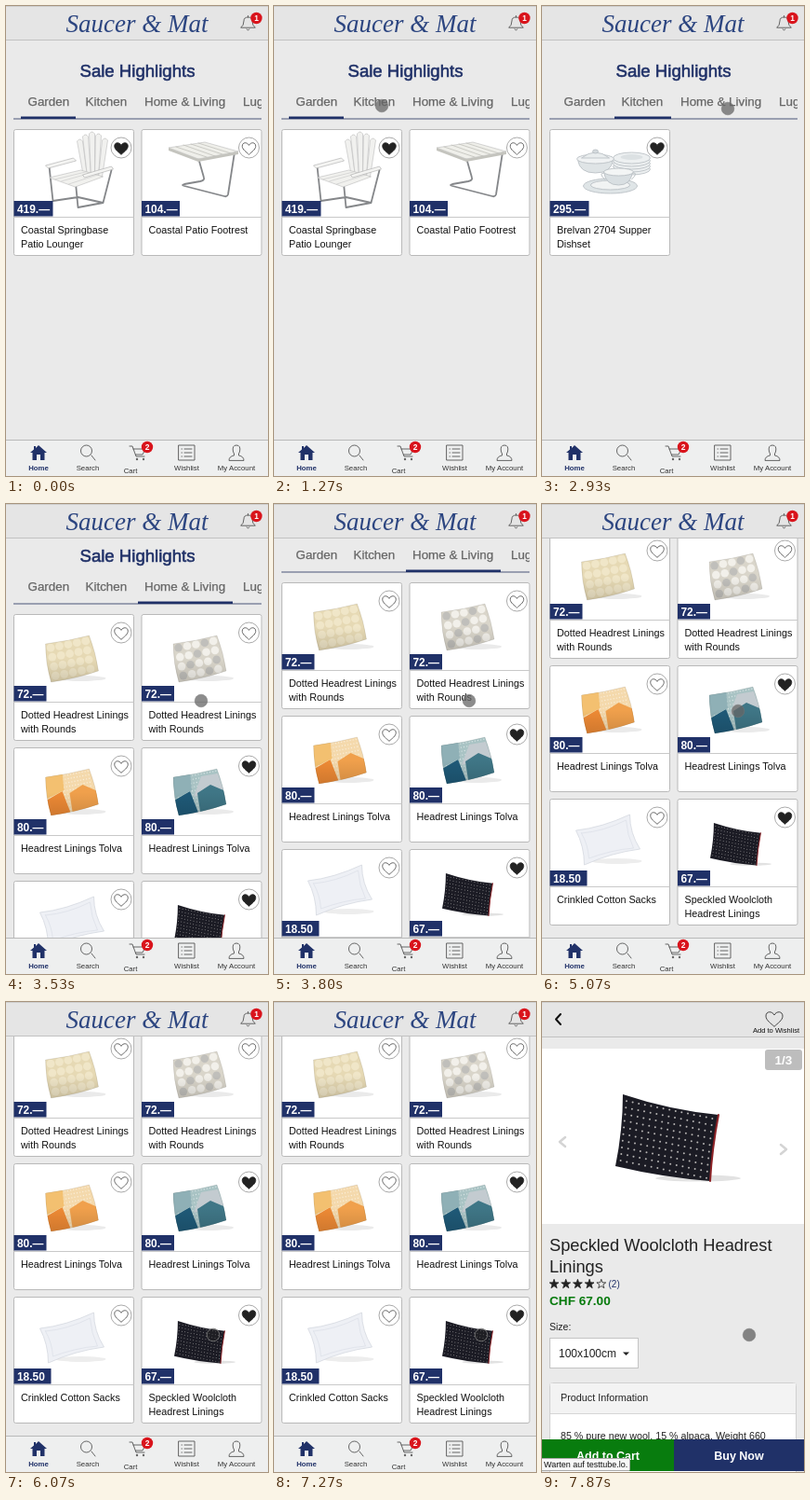
Write an HTML page that moves like this. It is 282 px wide and 504 px high and loops after 8 s.

```html
<!DOCTYPE html>
<html lang="en">
<head>
<meta charset="utf-8">
<title>Shop app</title>
<style>
html, body { margin: 0; width: 100%; height: 100%; overflow: hidden; background: #eaeaea; }
svg { display: block; width: 100%; height: 100%; font-family: "Liberation Sans", sans-serif; }
.logo { font-family: "Liberation Serif", serif; font-style: italic; }
.tab { font-size: 13.4px; fill: #666; stroke: #666; stroke-width: .25px; }
.line { fill: none; stroke: #555; stroke-width: .9; stroke-linejoin: round; stroke-linecap: round; }
.steel { stroke: #85878a; stroke-width: 1.8; }

.scroll, .garden, .kitchen, .living, .late, .look { animation: 8s step-end infinite; }
.garden { animation-name: garden; }
.kitchen { animation-name: kitchen; }
.living { animation-name: living; }
.late { animation-name: late; }
.scroll { animation-name: scroll; }
.look { animation-name: look; }
.detail { animation: detail 8s linear infinite; }
.cursor { animation: cursor 8s ease-in-out infinite; }

@keyframes garden { 0% { visibility: visible } 24.1%, to { visibility: hidden } }
@keyframes kitchen { 0% { visibility: hidden } 24.1% { visibility: visible } 37.45%, to { visibility: hidden } }
@keyframes living { 0% { visibility: hidden } 37.45%, to { visibility: visible } }
@keyframes late { 0% { visibility: hidden } 98.3%, to { visibility: visible } }
@keyframes scroll {
  0% { transform: none }
  44.1% { transform: translateY(-14px) }
  44.95% { transform: translateY(-30px) }
  47.45% { transform: translateY(-48px) }
  53.3% { transform: translateY(-56px) }
  54.95% { transform: translateY(-68px) }
  58.3% { transform: translateY(-82px) }
  62.45% { transform: translateY(-96px) }
  63.3%, to { transform: translateY(-102px) }
}
@keyframes detail { 0%, 91.4% { opacity: 0 } 94%, to { opacity: 1 } }
@keyframes cursor {
  0%, 9.25% { transform: translate(247px, 132px) }
  15.8%, 23.4% { transform: translate(116px, 107px) }
  29.1%, 37.4% { transform: translate(200px, 110px) }
  41.6%, 49.25% { transform: translate(210px, 211px) }
  51.6%, 66.75% { transform: translate(211px, 222px) }
  69.1%, to { transform: translate(223px, 357px) }
}
@keyframes look {
  0% { opacity: 0; fill: #666; fill-opacity: .75; stroke-opacity: .5 }
  9.95% { opacity: 1; fill: #666; fill-opacity: .75; stroke-opacity: .5 }
  75.8% { opacity: 1; fill: #222; fill-opacity: .4; stroke-opacity: .9 }
  91.5%, to { opacity: 1; fill: #777; fill-opacity: .9; stroke-opacity: .5 }
}
</style>
</head>
<body>
<svg id="stage" viewBox="0 0 282 504"></svg>
<script>
const NAVY = '#203168', RED = '#d9141c';
const CUSHION = 'M34 31Q58 28 81 22Q88 40 91 60Q68 68 40 72Q34 52 34 31Z';

const text = (x, y, size, str, attrs = '') =>
  `<text x="${x}" y="${y}" font-size="${size}" ${attrs}>${str}</text>`;
const rect = (x, y, w, h, fill, attrs = '') =>
  `<rect x="${x}" y="${y}" width="${w}" height="${h}" fill="${fill}" ${attrs}/>`;
const path = (d, fill, attrs = '') => `<path d="${d}" fill="${fill}" ${attrs}/>`;
const line = (d, style = '', kind = '') => `<path class="line ${kind}" d="${d}" style="${style}"/>`;
const oval = (x, y, rx, ry, fill, attrs = '') =>
  `<ellipse cx="${x}" cy="${y}" rx="${rx}" ry="${ry}" fill="${fill}" ${attrs}/>`;
const group = (transform, body) => `<g transform="${transform}">${body}</g>`;
const MID = 'text-anchor="middle"', BOLD = 'font-weight="bold"';

const heart = (x, y, w, fill, stroke) => {
  const s = w / 16;
  return path('M0 7C-3 4-8 1-8-3C-8-8-2-8 0-4C2-8 8-8 8-3C8 1 3 4 0 7Z', fill,
    `transform="translate(${x} ${y}) scale(${s})" stroke="${stroke}" stroke-width="${.9 / s}"`);
};
const badge = (x, y, n) =>
  oval(x, y, 6.2, 6.2, RED) + text(x, y + 3, 8.5, n, `fill="#fff" ${MID} ${BOLD}`);

// Rows and columns of dots spread over a skewed quad.
function dots([x0, y0], [ux, uy], [vx, vy], cols, rows, r, fill) {
  let out = '';
  for (let j = 0; j < rows; j++)
    for (let i = 0; i < cols; i++) {
      const a = (i + .5) / cols, b = (j + .5) / rows;
      out += oval((x0 + ux * a + vx * b).toFixed(1), (y0 + uy * a + vy * b).toFixed(1), r, r,
        typeof fill === 'function' ? fill(i, j) : fill);
    }
  return out;
}
const weave = (cols, rows, r, fill) => dots([34, 31], [47, -9], [7, 40], cols, rows, r, fill);

const cushion = (base, pattern) =>
  oval(72, 68, 27, 3, '#eaeaea') + path(CUSHION, base) +
  `<g clip-path="url(#cushion)">${pattern}</g>` +
  path(CUSHION, 'url(#shade)', 'stroke="#0002" stroke-width=".6"');

const patchwork = (base, main, second, third, middle = '') => cushion(base,
  weave(15, 10, .7, '#fff8') + middle +
  path('M38 74L35 56L52 46L63 74Z', main) +
  path('M60 48L74 39L95 48L95 68L64 74Z', second) +
  path('M33 30L52 25L54 45L36 54Z', third));

const whitePillow =
  oval(72, 66, 27, 3, '#ededed') +
  path('M28 33Q56 30 86 16Q86 36 97 53Q66 57 37 70Q37 50 28 33Z', '#eef0f5', 'stroke="#d5d8e0" stroke-width=".8"') +
  line('M34 36Q58 34 82 22Q83 38 90 52Q66 54 42 63Q41 48 34 36Z', 'stroke:#dfe2ea');

const bigCushion = oval(168, 189, 46, 3.5, '#e2e2e2') +
  path('M87 99Q138 116 190 121Q183 157 181 192Q130 188 79 176Q87 137 87 99Z', '#1b1b24') +
  dots([88, 102], [99, 20], [-7, 71], 15, 10, 1, '#b5b3b2') +
  line('M190 121Q183 157 181 192', 'stroke:#8e2327;stroke-width:2');
const darkCushion = group('translate(-3.7 -23.5) scale(.49)', bigCushion);

const slats = [[68, 11, 76], [74, 6, 80], [81, 3, 84], [88, 5, 88], [95, 10, 92]];
const chair =
  line('M38 39L42 76L69 72L96 78L69 83M66 52L69 83M105 43L96 78', '', 'steel') +
  slats.map(([x, y, b]) =>
    path(`M${x} ${y + 1}Q${x + 3} ${y - 3} ${x + 6} ${y + 1}L${b + 3} 50H${b - 1}Z`, '#f1f1ef',
      'stroke="#bbb" stroke-width=".6"')).join('') +
  path('M38 51L72 43L96 50L66 61Z', '#f1f1ee', 'stroke="#bbb" stroke-width=".6"') +
  line('M44 53L77 45M51 55L83 46M59 58L90 48', 'stroke:#ccc;stroke-width:.7') +
  path('M34 38L64 30L67 33L37 41ZM74 48L105 39L107 42L76 51Z', '#f4f4f2', 'stroke="#aaa" stroke-width=".6"');

const stool =
  line('M100 24L93 69Q92 72 89 71L46 60Q42 59 46 58L63 55Q68 54 67 51L61 30', '', 'steel') +
  path('M29 19L68 13L104 23L61 31Z', '#efefea', 'stroke="#bbb" stroke-width=".6"') +
  path('M29 19L61 31L104 23V26L61 34L29 22Z', '#c4c4be') +
  line('M37 18L70 29M45 16L79 28M53 15L87 26M61 14L96 25', 'stroke:#c0c0ba;stroke-width:.8');

const china = 'stroke="#b5bcc0" stroke-width=".8"';
const dishes =
  [42, 39, 36, 33, 30].map(y => oval(88, y, 20, 6, '#edf0f1', china)).join('') +
  oval(88, 29, 12, 3, '#dce1e3') +
  path('M30 32H68Q66 46 49 46Q32 46 30 32Z', '#dfe4e6', china) +
  oval(49, 31, 20, 5, '#f0f2f3', china) + path('M34 30Q49 18 64 30Z', '#e9edee', china) +
  oval(49, 23, 3, 2, '#d4dadd', china) +
  oval(65, 60, 29, 8, '#dfe5e7', china) + oval(65, 59, 21, 5, '#f1f3f3', china) +
  path('M58 45H89Q87 59 74 59Q60 59 58 45Z', '#d9dfe2', china) + oval(74, 45, 16, 4, '#f3f5f5', china) +
  line('M58 46Q52 46 59 53M89 46Q96 45 88 53', 'stroke:#b5bcc0');

function card(col, row, picture, price, tagWidth, names, liked) {
  return group(`translate(${col ? 146 : 8.5} ${133 + row * 143})`,
    rect(0, -.5, 129, 135, '#fff', 'rx="2" stroke="#b9b9b9"') +
    picture + rect(0, 93, 129, 1, '#c9c9c9') +
    rect(0, 76, tagWidth, 16.5, NAVY) +
    text(3.5, 88.5, 11.9, price, `fill="#fff" ${BOLD}`) +
    oval(115.5, 19, 11, 11, '#fff', 'stroke="#aaa"') +
    heart(115.5, 20, 14.5, liked ? '#222' : '#fff', liked ? '#222' : '#555') +
    names.map((n, i) => text(7.5, 111 + i * 15, 10.8, n, 'fill="#111"')).join(''));
}

const tabs = [['Garden', 23.5, 16, 59, 'garden'], ['Kitchen', 85.5, 78, 61, 'kitchen'],
  ['Home &amp; Living', 149, 142, 102, 'living'], ['Luggage', 255, 0, 0, '']];
const tabBar = rect(8, 120.5, 267, 1, '#4a5578') + '<g clip-path="url(#tabs)">' +
  tabs.map(([name, x, left, width, state]) =>
    `<text class="tab" x="${x}" y="106.5">${name}</text>` +
    (state ? rect(left, 118.5, width, 2.5, NAVY, `class="${state}"`) : '')).join('') + '</g>';

const rounds = ['Dotted Headrest Linings', 'with Rounds'];
const linings = ['Headrest Linings Tolva'];
const garden =
  card(0, 0, chair, '419.—', 42, ['Coastal Springbase', 'Patio Lounger'], true) +
  card(1, 0, stool, '104.—', 41, ['Coastal Patio Footrest'], false);
const kitchen = card(0, 0, dishes, '295.—', 42, ['Brelvan 2704 Supper', 'Dishset'], true);
const living =
  card(0, 0, cushion('#e6d9b4', weave(5, 4, 4.4, '#f0e6c8')), '72.—', 35, rounds, false) +
  card(1, 0, cushion('#d9d5ca', weave(5, 4, 4.3, (i, j) => (i + j) % 3 ? '#f2f0ea' : '#c0bfbb')),
    '72.—', 35, rounds, false) +
  card(0, 1, patchwork('#f4d9ac', '#ee8a35', '#f0a04c', '#f3c070'), '80.—', 35, linings, false) +
  card(1, 1, patchwork('#a9c3c4', '#1f5a78', '#3f7686', '#8fb0b6', path('M56 52L64 30L82 27L88 44Z', '#c3cbd0')),
    '80.—', 35, linings, true) +
  card(0, 2, whitePillow, '18.50', 40, ['Crinkled Cotton Sacks'], false) +
  card(1, 2, darkCushion, '67.—', 35, ['Speckled Woolcloth', 'Headrest Linings'], true);

const header = rect(0, 0, 282, 36, '#e5e5e5') + rect(0, 0, 282, 1, '#cfcfcf') +
  rect(0, 36, 282, 1, '#c2c2c2') +
  text(141, 28, 27, 'Saucer &amp; Mat', `class="logo" fill="#2c4580" ${MID}`) +
  line('M253 23Q256 21 256 16Q256 12 260.5 12Q265 12 265 16Q265 21 268 23ZM259 25Q260.5 27 262 25M260.5 12V10.5') +
  badge(269.5, 13, 1);

const footer = rect(0, 465, 282, 39, '#eeefef') + rect(0, 465, 282, 1, '#b9b9b9') +
  path('M35 471L44 479H41.5V487H37V481H33V487H28.5V479H26L30 475.5V472H32V474Z', NAVY) +
  line('M92 482L96 487') + oval(86.5, 477, 6, 6, 'none', 'stroke="#555" stroke-width=".9"') +
  line('M133 472H136L140 483H149M137 475H150L147 481H139.5') +
  oval(141, 486, 1.2, 1.2, '#666') + oval(148, 486, 1.2, 1.2, '#666') + badge(152, 473, 2) +
  line('M186 471H203V487H186ZM192 475H200M192 479H200M192 483H200M189 475H189.5M189 479H189.5M189 483H189.5') +
  line('M240 487Q240 483 245.5 482Q246 480 244.5 478Q243 471 248 471Q253 471 251.5 478Q250 480 250.5 482Q256 483 256 487Z') +
  [['Home', 35, 497.5], ['Search', 88, 497.5], ['Cart', 134, 500.5], ['Wishlist', 194.5, 497.5], ['My Account', 248, 497.5]]
    .map(([s, x, y], i) => text(x, y, 7.8, s, `${MID} ${i ? 'fill="#333"' : `fill="${NAVY}" ${BOLD}`}`)).join('');

const star = (x, y, full) => {
  let pts = '';
  for (let k = 0; k < 10; k++) {
    const a = k * Math.PI / 5, r = k % 2 ? 2.1 : 5.2;
    pts += `${(x + r * Math.sin(a)).toFixed(1)},${(y - r * Math.cos(a)).toFixed(1)} `;
  }
  return `<polygon points="${pts}" fill="${full ? '#222' : 'none'}" stroke="#222" stroke-width=".8"/>`;
};

const detail = rect(0, 0, 282, 504, '#eaeaea') + rect(0, 0, 282, 37, '#e5e5e5') +
  rect(0, 0, 282, 1, '#cfcfcf') + rect(0, 37, 282, 1, '#c2c2c2') +
  line('M20 13L15 18.5L20 24', 'stroke:#111;stroke-width:2') +
  heart(250, 18.5, 18, 'none', '#333') + text(252, 33, 7.6, 'Add to Wishlist', `fill="#111" ${MID}`) +
  rect(0, 50, 282, 188, '#fff') + bigCushion +
  rect(240, 51, 40, 22, '#bdbdbd', 'rx="3"') + text(260, 66.5, 13.5, '1/3', `fill="#fff" ${MID} ${BOLD}`) +
  line('M25 145L19 150L25 155M257 153L263 158L257 163', 'stroke:#d4d4d4;stroke-width:2.5') +
  text(8, 267, 18.3, 'Speckled Woolcloth Headrest', 'fill="#222"') + text(8, 290, 18.3, 'Linings', 'fill="#222"') +
  [0, 1, 2, 3, 4].map(i => star(13 + i * 12.7, 302.5, i < 4)).join('') +
  text(71.5, 306, 10, '(2)', `fill="${NAVY}"`) +
  text(8, 325, 13.6, 'CHF 67.00', `fill="#067a0c" ${BOLD}`) + text(8, 352, 10.5, 'Size:', 'fill="#222"') +
  '<g class="late">' +
  rect(8.5, 360.5, 95, 32, '#fff', 'stroke="#c4c4c4"') + text(18, 381, 12, '100x100cm', 'fill="#222"') +
  path('M87 375.5H94L90.5 379Z', '#222') +
  rect(8.5, 408.5, 265, 100, '#fff', 'rx="3" stroke="#d0d0d0"') + rect(9, 409, 264, 32, '#f3f3f3') +
  rect(9, 441, 264, 1, '#d6d6d6') + text(20, 428, 10.8, 'Product Information', 'fill="#222"') +
  text(20, 469, 10.7, '85 % pure new wool, 15 % alpaca, Weight 660', 'fill="#222"') + '</g>' +
  rect(0, 469, 142, 34, '#087c0e') + rect(142, 469, 140, 34, NAVY) +
  text(71, 490.5, 12.5, 'Add to Cart', `fill="#fff" ${MID} ${BOLD}`) +
  text(212, 490.5, 12.5, 'Buy Now', `fill="#fff" ${MID} ${BOLD}`) +
  '<g class="late">' + rect(-.5, 489.5, 95, 13, '#f7f7f7', 'rx="1" stroke="#aaa"') +
  text(2, 499, 9, 'Warten auf testtube.lo.', 'fill="#111"') + '</g>';

document.getElementById('stage').innerHTML = `
  <defs>
    <clipPath id="tabs">${rect(8, 85, 267, 40, '#000')}</clipPath>
    <clipPath id="cushion"><path d="${CUSHION}"/></clipPath>
    <linearGradient id="shade" x2="0" y2="1">
      <stop offset=".5" stop-color="#000" stop-opacity="0"/>
      <stop offset="1" stop-color="#000" stop-opacity=".13"/>
    </linearGradient>
  </defs>
  ${rect(0, 0, 282, 504, '#eaeaea')}
  <g class="scroll">
    ${text(141.5, 76, 18.6, 'Sale Highlights', `fill="${NAVY}" stroke="${NAVY}" stroke-width=".6" ${MID}`)}
    ${tabBar}
    <g class="garden">${garden}</g>
    <g class="kitchen">${kitchen}</g>
    <g class="living">${living}</g>
  </g>
  ${header}${footer}
  <g class="detail">${detail}</g>
  <g class="cursor"><circle class="look" r="6.8" stroke="#777"/></g>`;
</script>
</body>
</html>
```
